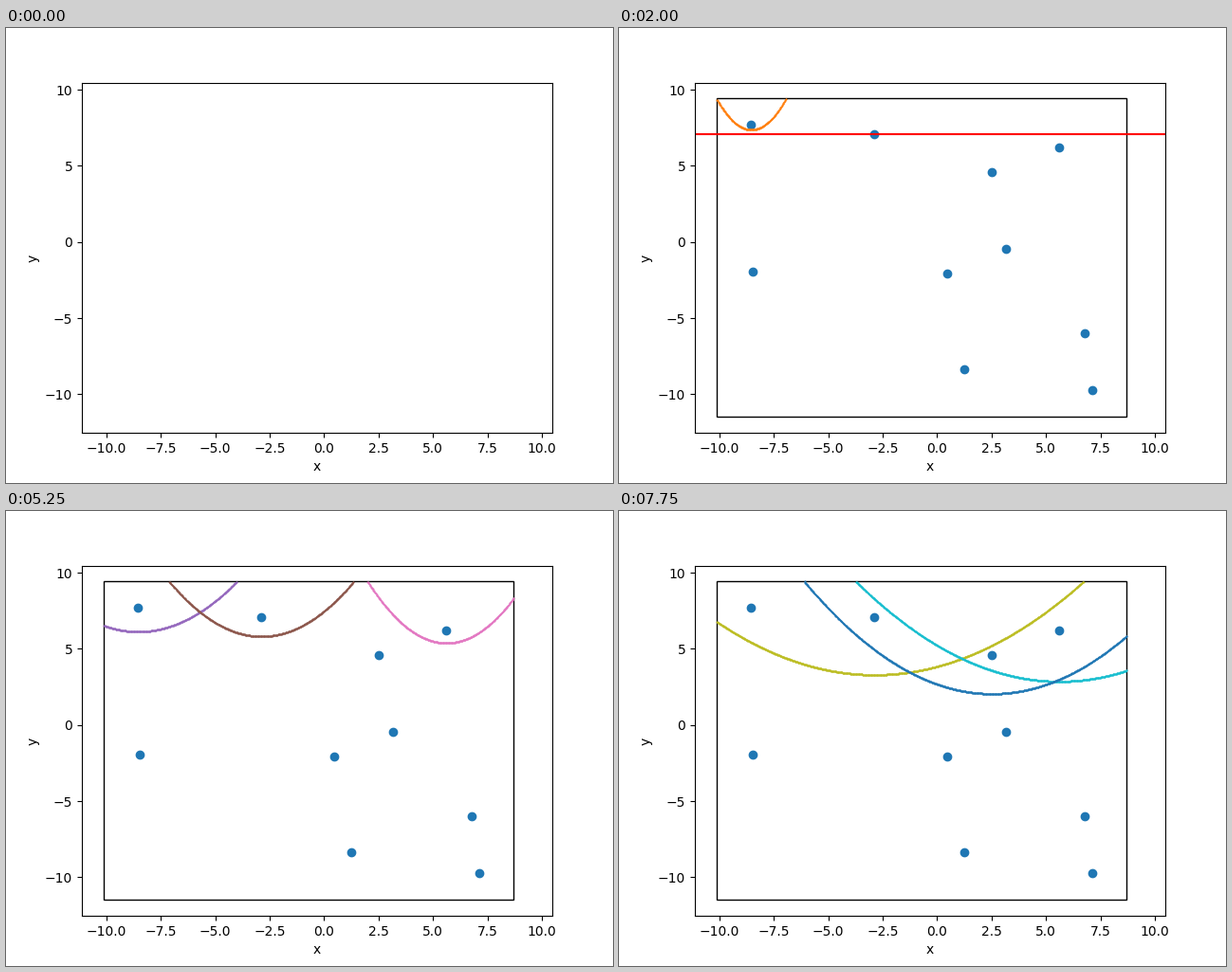
These frames come from a looping animation (640 px wide and 480 px high, 8000 ms). A matplotlib script:

```python
import numpy as np
import matplotlib.pyplot as plt
from matplotlib.animation import ArtistAnimation
from matplotlib.patches import Rectangle

FRAMES = 32
INTERVAL = 250

# Sites, ordered from top to bottom
SITES = np.array([
    (-8.54, 7.685), (-2.88, 7.06), (5.615, 6.19), (2.52, 4.57), (3.18, -0.47),
    (-8.457, -1.96), (0.44, -2.085), (6.79, -6.005), (1.26, -8.37), (7.14, -9.74),
])

low, high = SITES.min(axis=0), SITES.max(axis=0)
pad = 0.1 * (high - low)
left, bottom = low - pad
right, top = high + pad

fig, ax = plt.subplots(figsize=(6.4, 4.8), dpi=100)
ax.set_xlabel("x")
ax.set_ylabel("y")


def parabola(site, sweep, color):
    """Points equally far from the site and the sweep line, inside the box."""
    sx, sy = site
    x = np.linspace(left, right, 1000)
    y = (x - sx) ** 2 / (2 * (sy - sweep)) + (sy + sweep) / 2
    inside = y <= top
    return ax.scatter(x[inside], y[inside], s=2, linewidths=0, color=color)


dots = ax.scatter(SITES[:, 0], SITES[:, 1], color="C0")
box = ax.add_patch(Rectangle((left, bottom), right - left, top - bottom,
                             fill=False, edgecolor="black", linewidth=1))

# Every frame adds or removes a single artist
shown = []
frames = [[]]


def add(artist):
    shown.append(artist)
    frames.append(list(shown))


def remove(artist):
    shown.remove(artist)
    frames.append(list(shown))


add(dots)
add(box)

color_index = 1
for sweep in [top, *SITES[:5, 1]]:
    line = ax.axhline(sweep, color="red")
    add(line)
    curves = []
    for site in SITES[SITES[:, 1] > sweep]:
        curve = parabola(site, sweep, f"C{color_index}")
        color_index += 1
        curves.append(curve)
        add(curve)
    remove(line)
    for curve in curves:
        remove(curve)

ax.set_xlim(-11.13, 10.48)
ax.set_ylim(-12.536, 10.466)

# Hide artists until their first frame
for artist in {a for frame in frames for a in frame}:
    artist.set_visible(False)

anim = ArtistAnimation(fig, frames[:FRAMES], interval=INTERVAL,
                       repeat=True, repeat_delay=0, blit=False)
plt.show()
```
